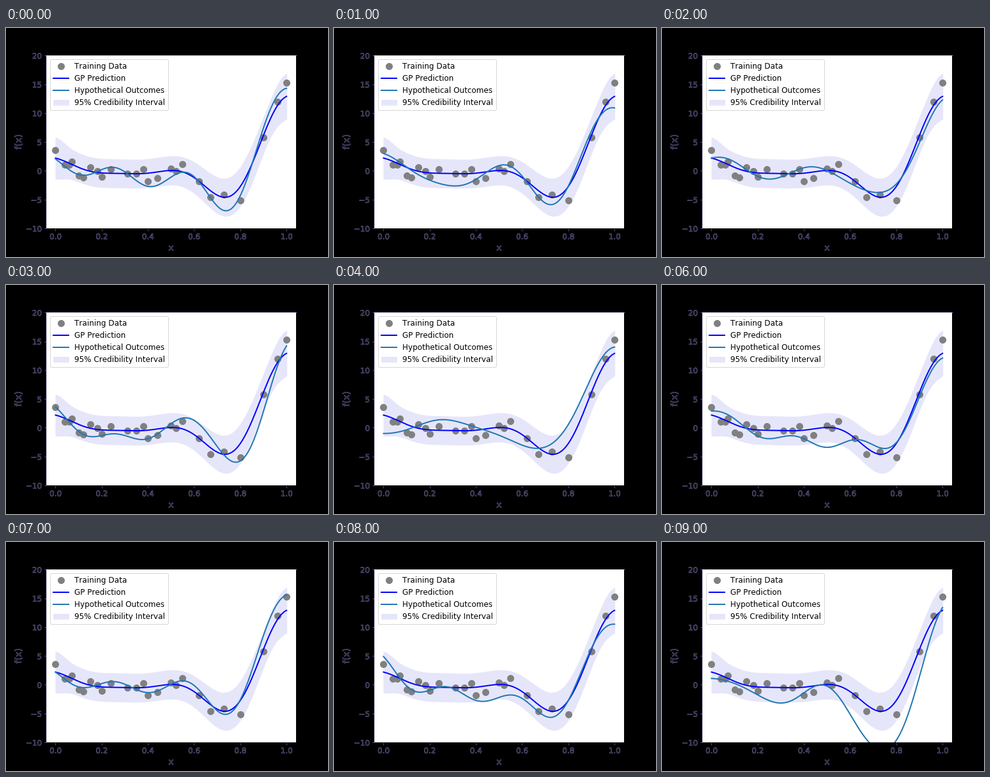
Write a matplotlib script that moves like this. It is 504 px wide and 360 px high and loops after 10 s.

```python
import numpy as np
import matplotlib.pyplot as plt
import matplotlib.patheffects as pe
from matplotlib.animation import FuncAnimation

plt.rcParams.update({"font.family": "DejaVu Sans", "font.size": 12,
                     "text.kerning_factor": 6})

GRID = np.linspace(0, 1, 200)
KNOTS = np.linspace(0, 1, 9)
RIM = "#6f6aa0"
EDGE = "#d8caf2"


def kernel(a, b, scale=0.12):
    return np.exp(-0.5 * ((a[:, None] - b) / scale) ** 2)


def curve(*values):
    """Noise-free Gaussian-process fit through a value at every eighth."""
    return kernel(GRID, KNOTS) @ np.linalg.solve(kernel(KNOTS, KNOTS), values)


def bump(center, width):
    return np.exp(-((GRID - center) / width) ** 2)


mean = curve(2.2, .2, -.45, -.5, .05, -1.95, -4.5, 3.6, 12.9)
half = 2.45 + 1.1 * bump(0, .05) + .9 * bump(.79, .16) + 1.3 * bump(1, .06)


def ripple(cycles, lift):
    """The mean with a gentle wave, raised toward its right end."""
    return mean + np.sin(2 * np.pi * cycles * GRID) + lift * GRID ** 6


outcomes = [
    curve(2.05, -.8, .6, -2.35, -1.1, -2.1, -6.85, 4.3, 14.3),
    curve(3, -.05, -2.3, -2.05, .9, -2.2, -5.5, 4.6, 10.9),
    ripple(3, -.6),
    curve(3.6, -1.25, -1.05, -2.05, .7, .5, -5.5, -.3, 14.2),
    curve(-1, 0, 1.4, .4, -1.3, -3.35, -2.05, 6.6, 14),
    ripple(2, -.9),
    curve(2.9, .75, -1.9, -1.55, -3.4, -2.05, -3.6, 2.95, 12.1),
    ripple(-3, 2.7),
    curve(4.9, -.95, -.35, -2.3, -2.2, -3.1, -5.3, 4.1, 10.5),
    curve(1.1, -.2, -2.75, -2.1, -.25, -6.8, -11.3, -2.1, 13.4),
]

train_x = [0, .04, .06, .07, .10, .12, .15, .18, .20, .24, .31, .35, .38,
           .40, .44, .50, .52, .55, .62, .67, .73, .80, .90, .96, 1]
train_y = [3.6, 1.05, 1.05, 1.6, -.85, -1.2, .6, -.05, -1.05, .25, -.5, -.5, .25,
           -1.8, -1.3, .4, -.05, 1.15, -1.8, -4.6, -4.15, -5.15, 5.8, 12, 15.3]

fig = plt.figure(figsize=(7, 5), dpi=72, facecolor="black")
ax = fig.add_axes([0.125, 0.125, 0.775, 0.755])

ax.plot(train_x, train_y, "o", color="gray", ms=10, label="Training Data")
ax.plot(GRID, mean, color="blue", lw=2, label="GP Prediction")
outcome, = ax.plot(GRID, outcomes[0], color="#1f77b4", lw=2,
                   label="Hypothetical Outcomes")
ax.fill_between(GRID, mean - half, mean + half, color="lavender",
                label="95% Credibility Interval")

ax.set(xlim=(-0.04, 1.04), ylim=(-10, 20), xticks=np.arange(0, 1.1, 0.2))
ax.set_xlabel("x", fontsize=14)
ax.set_ylabel("f(x)", fontsize=14)
ax.tick_params(color=RIM)
ax.spines[["left", "top"]].set_color(EDGE)
ax.spines[["right", "bottom"]].set_color("black")
ax.legend(loc="upper left")

# Black lettering that shows only by its thin rim
for text in (ax.xaxis.label, ax.yaxis.label,
             *ax.get_xticklabels(), *ax.get_yticklabels()):
    text.set_color("black")
    text.set_path_effects([pe.Stroke(linewidth=0.6, foreground=RIM)])


def update(i):
    outcome.set_ydata(outcomes[i])
    return outcome,


anim = FuncAnimation(fig, update, frames=len(outcomes), interval=1000,
                     repeat=True, repeat_delay=0)
plt.show()
```
